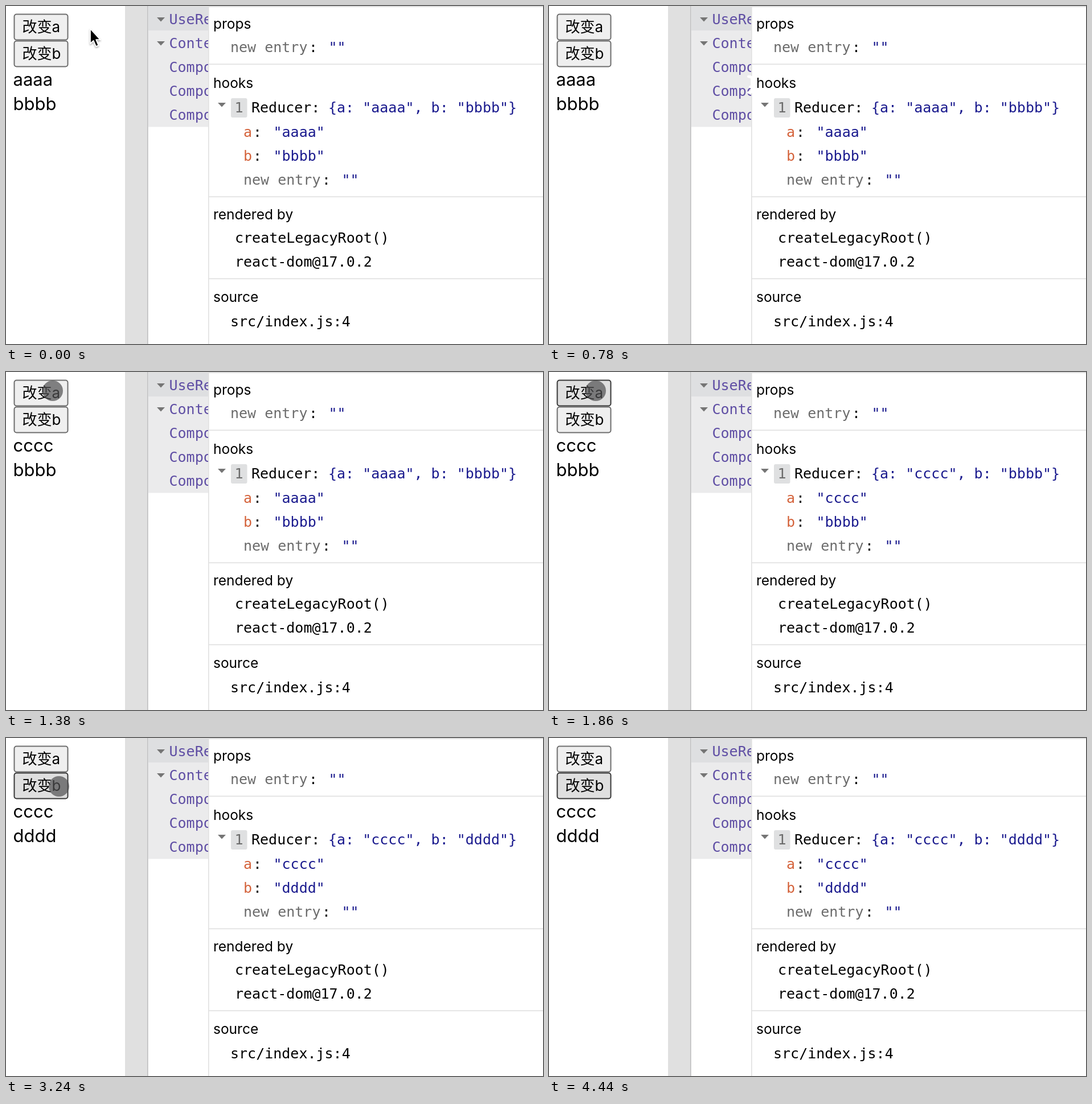
These frames come from a looping animation (943x594 px, 4.5 s). An HTML page:

```html
<!DOCTYPE html>
<html lang="zh">
<head>
<meta charset="utf-8">
<title>Reducer demo</title>
<style>
  html, body { margin: 0; width: 100%; height: 100%; overflow: hidden; background: #fff; }
  svg { display: block; width: 943px; height: 594px; }
  text { white-space: pre; fill: #000; }
  .mono { font: 25px "DejaVu Sans Mono", monospace; }
  .head { font: 24.5px Inter, sans-serif; }
  .page { font: 31px Inter, sans-serif; }
  .label { font: 26px Inter, "Noto Sans CJK SC", "Noto Sans CJK", sans-serif; }
  .tree { fill: #5f4ea4; }
  .dim { fill: #6b6b6b; }
  .value { fill: #1a1a8e; }
  .key { fill: #d4623a; }
  .btn { fill: #efefef; stroke: #6e6e6e; stroke-width: 2; }
  .btn.on { fill: #dfdfdf; stroke: #383838; }
  .fold { fill: #757575; }
  .rule { fill: #e0e0e0; }
</style>
</head>
<body>
<svg id="stage" viewBox="0 0 943 594" xmlns="http://www.w3.org/2000/svg">
  <defs>
    <clipPath id="treeClip"><rect x="250" width="105" height="594"/></clipPath>
    <filter id="shadow" x="-50%" y="-50%" width="200%" height="200%">
      <feDropShadow dx="0" dy="2" stdDeviation="1.5" flood-opacity=".35"/>
    </filter>
  </defs>

  <rect x="209" width="39" height="594" fill="#e0e0e0"/>
  <rect x="248" width="1.6" height="594" fill="#bdbdbf"/>
  <rect x="250" width="105" height="43" fill="#dedfe1"/>
  <rect x="250" y="43" width="105" height="169.5" fill="#ebebec"/>
  <g id="tree" clip-path="url(#treeClip)"></g>

  <g class="rule">
    <rect x="250" width="693" height="2"/>
    <rect x="355" width="1.6" height="594"/>
    <rect x="356" y="101.5" width="587" height="1.6"/>
    <rect x="356" y="334.5" width="587" height="1.6"/>
    <rect x="356" y="478.5" width="587" height="1.6"/>
  </g>
  <rect x="395" y="162" width="28.5" height="34" rx="3" fill="#dfe0e1"/>
  <g id="panel"></g>

  <rect id="btnA" class="btn" x="14.5" y="14.5" width="94" height="45" rx="4"/>
  <rect id="btnB" class="btn" x="14.5" y="61.5" width="94" height="45" rx="4"/>
  <g id="page"></g>

  <g id="cursor">
    <path id="arrow" filter="url(#shadow)" stroke="#fff" stroke-width="1.8" stroke-linejoin="round"
      d="M0 0V26L5.6 20.8L10 31L14.4 29.2L10.2 19.2H17.5Z"/>
    <g id="beam" fill="none" stroke-linecap="round">
      <path id="beamShape" stroke="#fff" stroke-width="4.5"
        d="M-6 -14Q-1 -14 0 -11Q1 -14 6 -14M0 -11V11M-6 14Q-1 14 0 11Q1 14 6 14M-3 4H3"/>
      <use href="#beamShape" style="stroke:#111;stroke-width:2"/>
    </g>
    <circle id="dot" r="18" fill="#505052" stroke="#fff" stroke-opacity=".7" stroke-width="2" paint-order="stroke"/>
  </g>
</svg>
<script>
const LOOP = 4500, STEP = 60;
const NS = "http://www.w3.org/2000/svg";
const $ = id => document.getElementById(id);

function add(parent, tag, attrs, content = "") {
  const el = document.createElementNS(NS, tag);
  for (const name in attrs) el.setAttribute(name, attrs[name]);
  el.textContent = content;
  return $(parent).appendChild(el);
}
const text = (parent, x, y, content, cls) => add(parent, "text", { x, y, class: cls }, content);
const fold = (parent, x, y) => add(parent, "path", { d: `M${x} ${y}h14l-7 7.5z`, class: "fold" });

["UseReducer", "Context.Provider", "Component1", "Component2", "Component3"]
  .forEach((name, i) => text("tree", 286.5, 32 + 42 * i, name, "mono tree"));
fold("tree", 265, 20);
fold("tree", 265, 62);

function newEntry(x, y) {
  text("panel", x, y, "new entry", "mono dim");
  text("panel", x + 138, y, ":", "mono");
  text("panel", x + 172.5, y, '""', "mono value");
}
function entry(y, key) {
  text("panel", 417, y, key, "mono key");
  text("panel", 434, y, ":", "mono");
  return text("panel", 469.5, y, "", "mono value");
}

text("panel", 364, 40, "props", "head");
newEntry(394, 81);
text("panel", 364, 144, "hooks", "head");
fold("panel", 372, 170);
text("panel", 401.5, 187, "1", "mono dim");
text("panel", 431, 187, "Reducer:", "mono");
const summary = text("panel", 566, 187, "", "mono value");
const entryA = entry(230, "a");
const entryB = entry(272, "b");
newEntry(417, 314);
text("panel", 364, 375, "rendered by", "head");
text("panel", 402, 416, "createLegacyRoot()", "mono");
text("panel", 402, 458, "react-dom@17.0.2", "mono");
text("panel", 364, 520, "source", "head");
text("panel", 394, 563, "src/index.js:4", "mono");

text("page", 28.5, 46, "改变a", "label");
text("page", 28.5, 93, "改变b", "label");
const pageA = text("page", 12.5, 140, "", "page");
const pageB = text("page", 12.5, 183, "", "page");

// Cursor stops: [ms, x, y]
const path = [
  [0, 148, 40], [420, 540, 178], [600, 540, 178], [960, 173, 98], [1260, 82, 33],
  [2040, 82, 33], [2400, 105, 72], [2580, 93, 85], [3600, 93, 85], [4260, 150, 620], [LOOP, 150, 620]
];

function cursorAt(t) {
  const i = path.findIndex(stop => stop[0] > t);
  const [t0, x0, y0] = path[i - 1], [t1, x1, y1] = path[i];
  const p = (t - t0) / (t1 - t0), k = p * p * (3 - 2 * p);
  return [x0 + (x1 - x0) * k, y0 + (y1 - y0) * k];
}

const show = (id, on) => $(id).style.display = on ? "" : "none";

function draw(t) {
  const valueA = at => t < at ? "aaaa" : "cccc";
  const valueB = at => t < at ? "bbbb" : "dddd";
  pageA.textContent = valueA(1320);
  pageB.textContent = valueB(2820);
  const a = `"${valueA(1680)}"`, b = `"${valueB(3120)}"`;
  summary.textContent = `{a: ${a}, b: ${b}}`;
  entryA.textContent = a;
  entryB.textContent = b;

  $("btnA").classList.toggle("on", t >= 1440 && t < 2820);
  $("btnB").classList.toggle("on", t >= 2820);

  const [x, y] = cursorAt(t);
  const kind = x > 356 ? "beam" : x > 209 || t < 240 ? "arrow" : "dot";
  for (const id of ["arrow", "beam", "dot"]) show(id, id === kind);
  const overButton = x < 100 && y < 107;
  $("dot").setAttribute("fill-opacity", overButton ? .7 : .62);
  $("dot").setAttribute("stroke-opacity", overButton ? 0 : .7);
  $("cursor").setAttribute("transform", `translate(${x.toFixed(1)} ${y.toFixed(1)})`);
}

function tick() {
  const t = performance.now() % LOOP;
  draw(Math.floor(t / STEP) * STEP);
  requestAnimationFrame(tick);
}
tick();
</script>
</body>
</html>
```
